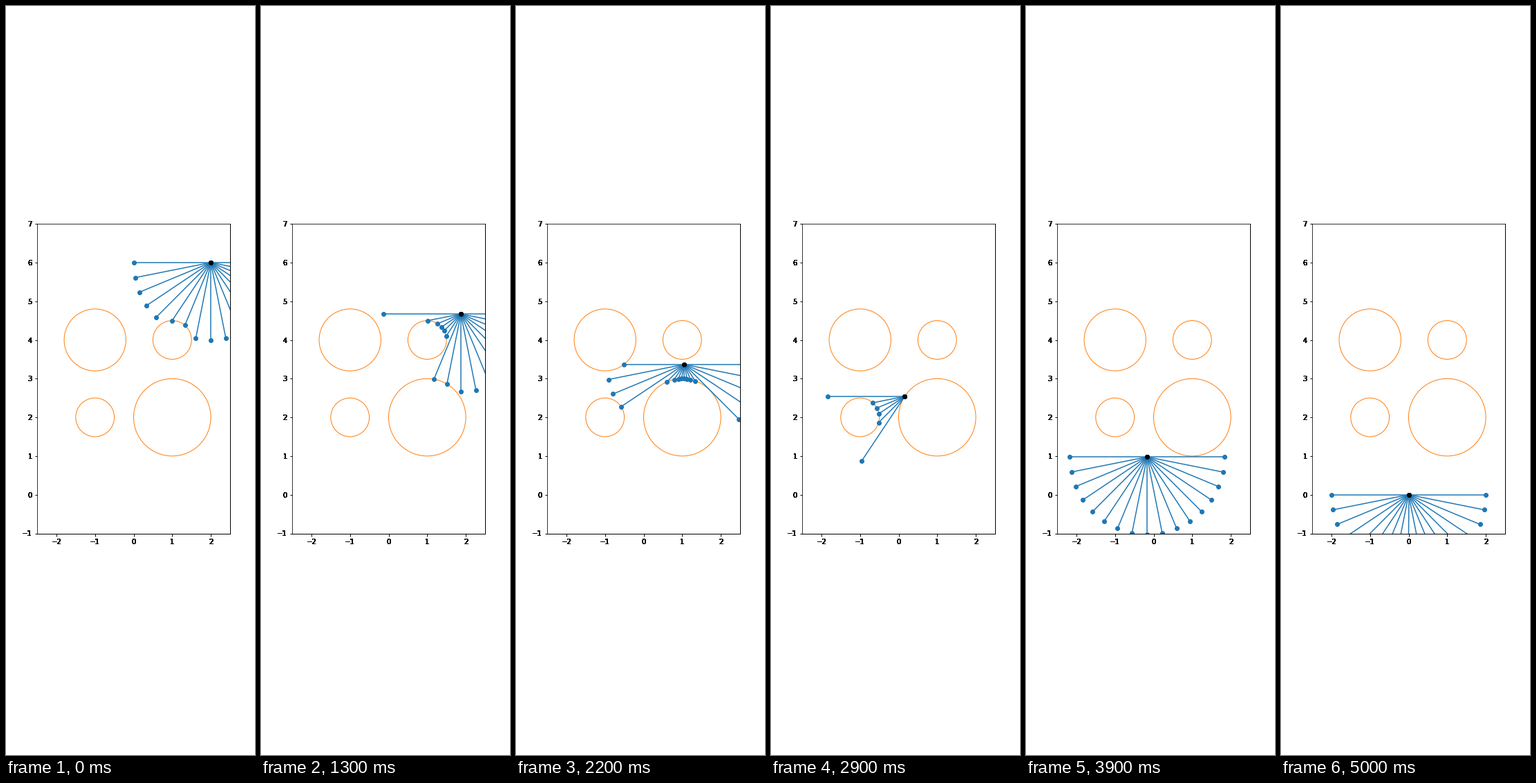
Animation of 360 by 1080 pixels, one loop 5100 ms. Source, as a matplotlib script:

```python
import numpy as np
import matplotlib.pyplot as plt
from matplotlib.animation import FuncAnimation

WIDTH, HEIGHT, DPI = 360, 1080, 72
FRAMES, INTERVAL = 51, 100
SCALE = 279 / 5  # pixels per unit
RANGE = 2.0
ANGLES = np.linspace(np.pi, 2 * np.pi, 17)
OBSTACLES = [((-1, 2), 0.5), ((1, 2), 1.0), ((-1, 4), 0.8), ((1, 4), 0.5)]

# Key points of the robot's path: frame, x, y
WAYPOINTS = np.array([
    (0, 2, 6), (8, 1.993, 5.408), (13, 1.872, 4.67), (18, 1.535, 3.875),
    (22, 1.053, 3.368), (29, 0.157, 2.54), (35, -0.162, 1.605),
    (42, -0.12, 0.565), (50, 0, 0)])


def clamped_spline(k, v, t):
    """Cubic spline through values v at times k, at rest at both ends."""
    h, n = np.diff(k), len(k)
    rate = np.diff(v) / h
    system, rhs = np.eye(n), np.zeros(n)
    for i in range(1, n - 1):
        system[i, i - 1:i + 2] = h[i], 2 * (h[i - 1] + h[i]), h[i - 1]
        rhs[i] = 3 * (h[i] * rate[i - 1] + h[i - 1] * rate[i])
    slope = np.linalg.solve(system, rhs)
    j = np.clip(np.searchsorted(k, t, side="right") - 1, 0, n - 2)
    s = (t - k[j]) / h[j]
    return ((1 + 2 * s) * (1 - s) ** 2 * v[j] + s * (1 - s) ** 2 * h[j] * slope[j]
            + s ** 2 * (3 - 2 * s) * v[j + 1] + s ** 2 * (s - 1) * h[j] * slope[j + 1])


def ray_length(origin, direction):
    """Distance to the first obstacle, limited by the sensor range."""
    length = RANGE
    for center, radius in OBSTACLES:
        offset = np.array(center) - origin
        along = offset @ direction
        half_sq = radius ** 2 - (offset @ offset - along ** 2)
        if half_sq >= 0:
            hit = along - np.sqrt(half_sq)
            if 0 <= hit < length:
                length = hit
    return length


def overprint_labels(copies):
    """Repeat the tick labels in place, which gives hard, dark digits."""
    x_transform, x_va, x_ha = ax.get_xaxis_text1_transform(7)
    y_transform, y_va, y_ha = ax.get_yaxis_text1_transform(7)
    for _ in range(copies):
        for x in ax.get_xticks():
            ax.text(x, 0, f"{x:.0f}".replace("-", "\u2212"),
                    transform=x_transform, va=x_va, ha=x_ha)
        for y in ax.get_yticks():
            ax.text(0, y, f"{y:.0f}".replace("-", "\u2212"),
                    transform=y_transform, va=y_va, ha=y_ha)


plt.rcParams.update({"font.family": "DejaVu Sans", "font.size": 10, "axes.linewidth": 1})
fig = plt.figure(figsize=(WIDTH / DPI, HEIGHT / DPI), dpi=DPI, facecolor="white")
ax = fig.add_axes([45 / WIDTH, 319.5 / HEIGHT, 5 * SCALE / WIDTH, 8 * SCALE / HEIGHT])
ax.set(xlim=(-2.5, 2.5), ylim=(-1, 7), xticks=range(-2, 3), yticks=range(-1, 8))
ax.tick_params(width=1, length=3.5, pad=3.5)
ax.spines[["left", "top"]].set_linewidth(0.8)
overprint_labels(16)

for center, radius in OBSTACLES:
    ax.add_patch(plt.Circle(center, radius, fill=False, edgecolor="C1", linewidth=1))
rays = [ax.plot([], [], "o-", color="C0", linewidth=1.5, markersize=6)[0] for _ in ANGLES]
robot, = ax.plot([], [], "o", color="black", markersize=6)

times, *coordinates = WAYPOINTS.T
path = np.column_stack([clamped_spline(times, values, np.arange(FRAMES))
                        for values in coordinates])


def update(frame):
    position = path[frame]
    for ray, angle in zip(rays, ANGLES):
        direction = np.array([np.cos(angle), np.sin(angle)])
        end = position + ray_length(position, direction) * direction
        ray.set_data(*zip(position, end))
    robot.set_data(position[:1], position[1:])
    return [*rays, robot]


animation = FuncAnimation(fig, update, frames=FRAMES, interval=INTERVAL,
                          repeat=True, repeat_delay=0, blit=False)
plt.show()
```
